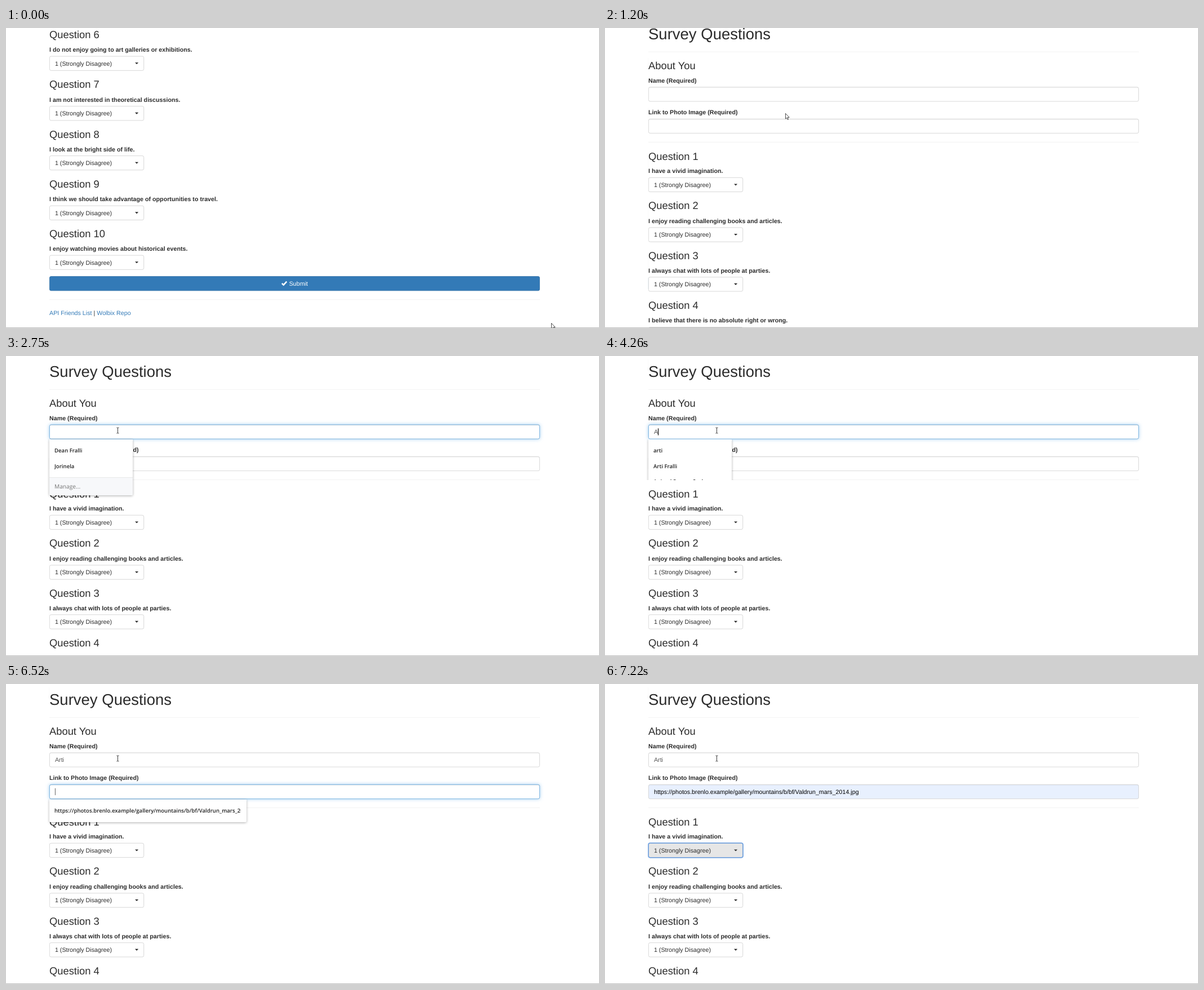
Recreate the animation shown at these times as an HTML page. Size 1053 by 532 pixels, loop 8000 ms.

```html
<!DOCTYPE html>
<html lang="en">
<head>
<meta charset="utf-8">
<title>Survey</title>
<style>
  html, body { margin: 0; width: 100%; height: 100%; overflow: hidden; background: #fff; }
  #stage { position: relative; width: 1053px; height: 532px; overflow: hidden; }
  #scroller { position: absolute; left: 77px; top: 13px; }
  #page {
    width: 1140px; transform: scale(.764); transform-origin: 0 0; color: #2b2b2b;
    font: 14px/20px "Liberation Sans", Arial, sans-serif;
    text-rendering: geometricPrecision; white-space: nowrap;
  }
  #page * { box-sizing: border-box; }
  h1, h3 { font-weight: 400; line-height: 1.1; margin: 20px 0 10px; }
  h1 { font-size: 36px; margin-top: 0; }
  h3 { font-size: 24px; }
  hr { border: 0; border-top: 1px solid #eee; margin: 20px 0; height: 1px; }
  label { display: block; font-weight: 700; margin-bottom: 5px; }
  .field, .select {
    position: relative; display: flex; align-items: center; height: 34px;
    padding: 0 12px; border: 1px solid #ccc; border-radius: 4px; background: #fff;
  }
  .field { margin-bottom: 15px; color: #555; box-shadow: inset 0 1px 1px rgba(0,0,0,.075); }
  .field::after {
    content: ""; position: absolute; inset: -1px; border: 1px solid #66afe9; border-radius: 4px;
    box-shadow: inset 0 1px 1px rgba(0,0,0,.075), 0 0 8px rgba(102,175,233,.6);
    opacity: var(--ring, 0);
  }
  .field.filled { background: #e8f0fe; color: #000; }
  .field.preview { font-size: 13.333px; }
  .field i { width: 1.31px; height: 16px; background: #333; }
  .select { width: 220px; justify-content: space-between; }
  .select::after { content: ""; border: 4px solid transparent; border-top-color: #2b2b2b; border-bottom: 0; }
  .select.active { background: #e6e6e6; border-color: #8c8c8c; outline: 2px solid #6ba1e6; outline-offset: -1px; }
  .submit {
    display: flex; align-items: center; justify-content: center; gap: 4px; height: 34px; margin-top: 15px;
    color: #fff; background: #337ab7; border: 1px solid #2e6da4; border-radius: 4px;
  }
  footer span { color: #337ab7; }
  #menu {
    position: absolute; left: 77px; overflow: hidden; background: #fff; padding: 6px 0;
    box-shadow: 0 1px 4px rgba(0,0,0,.32); border-radius: 0 0 2px 2px; box-sizing: border-box;
    font: 600 9.6px/27.5px "Open Sans", "Noto Sans", sans-serif; color: #222; white-space: nowrap;
    text-rendering: geometricPrecision;
  }
  #menu div { padding: 0 10px 0 9px; height: 27.5px; }
  #menu span { display: block; overflow: hidden; }
  #menu .hot { background: #e9eaeb; }
  #menu .manage {
    height: 32px; line-height: 31px; margin: 6px 0 -6px; color: #767676;
    background: #f7f8fa; border-top: 1px solid #e8e8e8; box-sizing: border-box;
    font-size: 10.2px; font-weight: 400;
  }
  #edge { position: absolute; left: 0; right: 0; top: 531px; height: 1px; background: #bdbdbd; }
  #mouse { position: absolute; left: 0; top: 0; overflow: visible; }
</style>
</head>
<body>
<div id="stage">
  <div id="scroller"><div id="page">
    <h1>Survey Questions</h1>
    <hr>
    <h3>About You</h3>
    <label>Name (Required)</label>
    <div class="field" id="name"></div>
    <label>Link to Photo Image (Required)</label>
    <div class="field" id="link"></div>
    <hr>
    <div id="questions"></div>
    <div class="submit">
      <svg width="14" height="13" viewBox="0 0 14 13"><path d="M1.5 6.5 5.3 10.3 12.6 2.5" fill="none" stroke="#fff" stroke-width="3.2"/></svg>
      Submit
    </div>
    <hr>
    <footer><span>API Friends List</span> | <span>Wolbix Repo</span></footer>
  </div></div>
  <div id="menu"></div>
  <div id="edge"></div>
  <svg id="mouse" width="8" height="13">
    <path id="arrow" d="M.5 .5V10L2.7 8 4.2 11.5 5.7 10.9 4.3 7.5H7.2Z" fill="#fff" stroke="#222" stroke-width=".8"/>
    <path id="beam" d="M-2-5H-.6L0-4.5.6-5H2M0-4.5V4.5M-2 5H-.6L0 4.5.6 5H2" fill="none" stroke="#222" stroke-width=".9"/>
  </svg>
</div>
<script>
const $ = id => document.getElementById(id);
const LOOP = 8000;
const URL_TEXT = "https://photos.brenlo.example/gallery/mountains/b/bf/Valdrun_mars_2014.jpg";

const questions = [
  "I have a vivid imagination.",
  "I enjoy reading challenging books and articles.",
  "I always chat with lots of people at parties.",
  "I believe that there is no absolute right or wrong.",
  "I prefer variety to routine.",
  "I do not enjoy going to art galleries or exhibitions.",
  "I am not interested in theoretical discussions.",
  "I look at the bright side of life.",
  "I think we should take advantage of opportunities to travel.",
  "I enjoy watching movies about historical events."
];
$("questions").innerHTML = questions.map((text, i) =>
  `<h3>Question ${i + 1}</h3><label>${text}</label><div class="select">1 (Strongly Disagree)</div>`).join("");
const firstSelect = document.querySelector(".select");

const recent = { top: 148, width: 148, rows: ["Dean Fralli", "Jorinela"], manage: true };
const matches = { top: 148, width: 148, rows: ["arti", "Arti Fralli", "Animal Person Sock"] };
const fewer = { ...matches, rows: matches.rows.slice(0, 2) };
const links = { top: 205, width: 350, rows: [URL_TEXT] };

const start = {
  scroll: 673, mouse: [968, 523], beam: false, caret: null, menu: null,
  name: "", link: "", nameRing: 0, linkRing: 0, filled: false, preview: false, active: false
};

// Each beat changes part of the state and holds until the next one.
const beats = [
  [0, {}],
  [70, { mouse: [790, 412] }],
  [170, { mouse: [520, 245] }],
  [270, { mouse: [345, 139] }],
  [410, { mouse: [328, 147] }],
  [510, { mouse: [320, 151] }],
  [820, { scroll: 367 }],
  [1090, { scroll: 170 }],
  [1200, { scroll: 17 }],
  [1290, { scroll: 0 }],
  [1530, { mouse: [306, 150] }],
  [1620, { mouse: [272, 142], beam: true }],
  [1710, { mouse: [236, 137] }],
  [1800, { mouse: [208, 132] }],
  [1880, { mouse: [194, 128] }],
  [1970, { mouse: [191, 130] }],
  [2060, { mouse: [198.5, 132] }],
  [2260, { nameRing: .4, caret: "name" }],
  [2350, { nameRing: .85, menu: recent }],
  [2440, { nameRing: 1 }],
  [2750, { caret: null }],
  [3200, { caret: "name" }],
  [3790, { caret: null }],
  [3950, { caret: "name", name: "A" }],
  [4030, { menu: null }],
  [4260, { menu: { ...matches, clip: 72 } }],
  [4340, { menu: matches, name: "Ar" }],
  [4420, { menu: fewer, name: "Art" }],
  [4590, { name: "Arti" }],
  [4900, { menu: null, caret: "link", nameRing: .7, linkRing: .3 }],
  [4980, { nameRing: .2, linkRing: .8 }],
  [5060, { nameRing: 0, linkRing: 1 }],
  [5430, { caret: null }],
  [5960, { caret: "link" }],
  [6520, { menu: links }],
  [6590, { menu: { ...links, hot: true }, caret: null }],
  [6660, { link: URL_TEXT, filled: true, preview: true }],
  [7040, { menu: null, preview: false, linkRing: .7 }],
  [7130, { linkRing: .2, active: true }],
  [7220, { linkRing: 0 }]
];

function drawField(id, state) {
  const field = $(id);
  field.innerHTML = `<span>${state[id]}</span>${state.caret === id ? "<i></i>" : ""}`;
  field.style.setProperty("--ring", state[id + "Ring"]);
}

function drawMenu(menu) {
  const box = $("menu");
  box.hidden = !menu;
  if (!menu) return;
  box.style.top = menu.top + "px";
  box.style.width = menu.width + "px";
  box.style.clipPath = menu.clip ? `inset(0 -6px calc(100% - ${menu.clip}px) -6px)` : "none";
  box.innerHTML = menu.rows.map(row => `<div class="${menu.hot ? "hot" : ""}"><span>${row}</span></div>`).join("")
    + (menu.manage ? '<div class="manage">Manage...</div>' : "");
}

function draw(state) {
  $("scroller").style.transform = `translateY(${-state.scroll}px)`;
  $("mouse").style.transform = `translate(${state.mouse[0]}px, ${state.mouse[1]}px)`;
  $("arrow").style.display = state.beam ? "none" : "";
  $("beam").style.display = state.beam ? "" : "none";
  drawField("name", state);
  drawField("link", state);
  $("link").classList.toggle("filled", state.filled);
  $("link").classList.toggle("preview", state.preview);
  firstSelect.classList.toggle("active", state.active);
  drawMenu(state.menu);
}

let shown = 0;
function tick() {
  const time = performance.now() % LOOP;
  const count = beats.filter(([at]) => at <= time).length;
  if (count !== shown) {
    shown = count;
    draw(Object.assign({}, start, ...beats.slice(0, count).map(([, change]) => change)));
  }
  requestAnimationFrame(tick);
}
tick();
</script>
</body>
</html>
```
